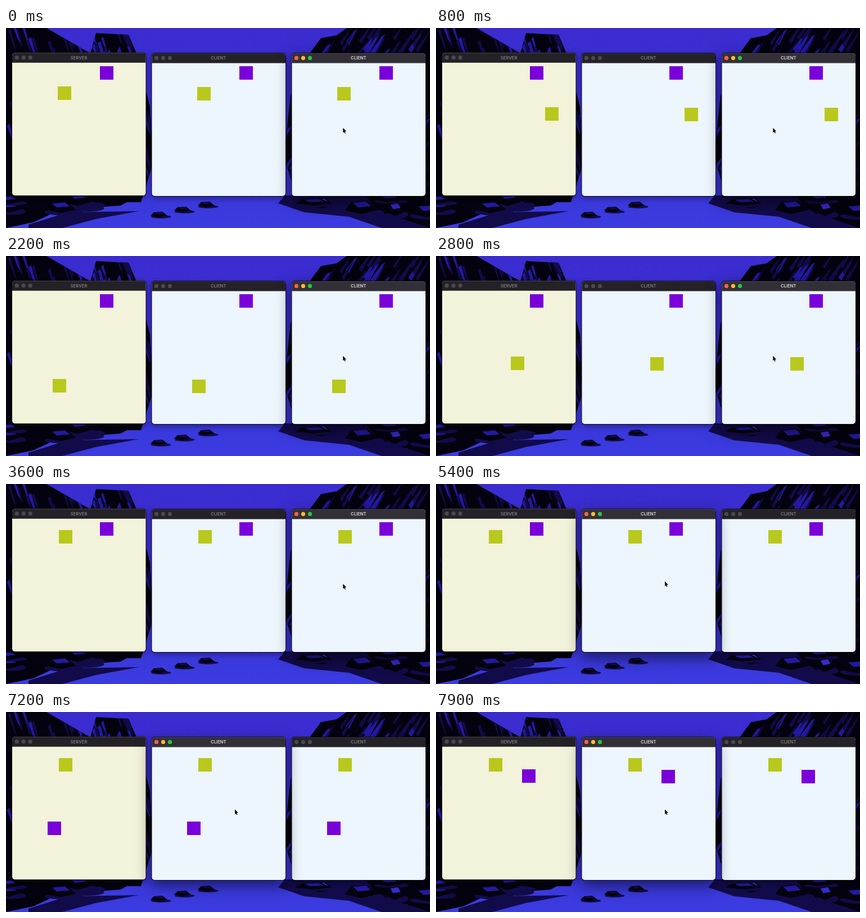
An HTML page with a canvas for the animation above (8 s loop, 754 by 356 pixels).

```html
<!DOCTYPE html>
<html lang="en">
<head>
<meta charset="utf-8">
<title>Server and clients</title>
<style>
html, body { margin: 0; width: 100%; height: 100%; overflow: hidden; background: #3b2fd4; }
canvas { display: block; width: 754px; height: 356px; }
</style>
</head>
<body>
<canvas id="stage" width="754" height="356"></canvas>
<script>
const W = 754, H = 356, LOOP = 8000, STEP = 100;
const canvas = document.getElementById('stage');
const ctx = canvas.getContext('2d');

const windows = [
  { title: 'SERVER', x: 11, y: 44.3, fill: '#f3f2da' },
  { title: 'CLIENT', x: 259.3, y: 45, fill: '#edf5fd' },
  { title: 'CLIENT', x: 508.3, y: 45, fill: '#edf5fd' }
];
const WIN_W = 237.7, WIN_H = 254, BAR = 17.5, BOX = 24;
const ROCK = { black: '#04020e', navy: '#120b4a', mid: '#2419a0', blue: '#352bcb' };

// Evenly timed waypoints, placed in the first window
const walkers = [
  {
    color: '#b9c81c', start: 0, every: 400,
    points: [[91.5, 104], [125, 158], [194, 141], [112, 102], [62.3, 139.3],
      [65, 203], [104, 222], [132.7, 179], [127, 106], [94, 81.5]]
  },
  {
    color: '#7a00da', start: 5800, every: 350,
    points: [[167, 67.7], [170, 128], [160, 206], [110, 234],
      [73.8, 194.7], [130, 99], [152.8, 102]]
  }
];

const clamp = (v, lo, hi) => Math.min(hi, Math.max(lo, v));

// Smooth curve through the waypoints, at rest at both ends
function place({ points, start, every }, t) {
  const last = points.length - 1;
  const s = clamp((t - start) / every, 0, last);
  const i = Math.min(Math.floor(s), last - 1), u = s - i;
  const slope = (k, axis) =>
    k === 0 || k === last ? 0 : (points[k + 1][axis] - points[k - 1][axis]) / 2;
  return [0, 1].map(axis => {
    const a = points[i][axis], d = points[i + 1][axis] - a;
    const m = slope(i, axis), n = slope(i + 1, axis);
    return a + u * m + u * u * (3 * d - 2 * m - n) + u * u * u * (m + n - 2 * d);
  });
}

function randomizer(seed) {
  return (lo, hi) => {
    seed = (seed * 16807) % 2147483647;
    return lo + (hi - lo) * seed / 2147483647;
  };
}

function poly(g, color, points) {
  g.fillStyle = color;
  g.beginPath();
  points.forEach(p => g.lineTo(...p));
  g.fill();
}

function oval(g, color, x, y, rx, ry) {
  g.fillStyle = color;
  g.beginPath();
  g.ellipse(x, y, rx, ry, 0, 0, Math.PI * 2);
  g.fill();
}

// A cliff face with slanted streaks of light
function cliff(g, rnd, outline, lean, streaks) {
  const xs = outline.map(p => p[0]);
  const left = Math.min(...xs), right = Math.max(...xs);
  g.save();
  poly(g, ROCK.black, outline);
  g.clip();
  for (let i = 0; i < streaks; i++) {
    const x = rnd(left, right), y = rnd(-10, 280);
    const w = rnd(2, 7), h = rnd(18, 48);
    const color = [ROCK.navy, ROCK.mid, ROCK.navy][i % 3];
    poly(g, color, [[x, y], [x + w, y - 4], [x + w + lean * h, y + h], [x + lean * h, y + h * 0.8]]);
  }
  g.restore();
}

// A flat-topped stone with its shadow on the water
function boulder(g, x, y, w, h, lit) {
  oval(g, ROCK.navy, x + w * 0.12, y + h * 0.4, w * 0.6, h * 0.3);
  poly(g, ROCK.black, [[x - w / 2, y + h * 0.2], [x - w * 0.3, y - h * 0.4],
    [x + w * 0.2, y - h * 0.5], [x + w / 2, y + h * 0.2], [x, y + h / 2]]);
  poly(g, lit, [[x - w * 0.25, y - h * 0.35], [x + w * 0.15, y - h * 0.45],
    [x + w * 0.3, y - h * 0.1], [x - w * 0.1, y]]);
}

function paintScene() {
  const scene = document.createElement('canvas');
  scene.width = W;
  scene.height = H;
  const g = scene.getContext('2d');
  const rnd = randomizer(29);

  const sky = g.createLinearGradient(0, 0, 0, H);
  sky.addColorStop(0, '#3b2cd0');
  sky.addColorStop(0.6, '#3730d2');
  sky.addColorStop(1, '#3b3ce0');
  g.fillStyle = sky;
  g.fillRect(0, 0, W, H);

  for (let i = 0; i < 20; i++) {
    g.fillStyle = 'rgba(110,120,240,.3)';
    g.fillRect(rnd(240, 500), rnd(30, 36), 1, 1);
  }

  cliff(g, rnd, [[0, 0], [72, 0], [150, 45], [160, 9], [218, 12], [232, 45],
    [256, 140], [262, 240], [240, 310], [0, 310]], 0.3, 150);
  cliff(g, rnd, [[W, 0], [606, 0], [588, 13], [560, 18], [540, 45],
    [506, 120], [494, 230], [520, 310], [W, 310]], -0.6, 150);

  // Banks on both sides of the water
  poly(g, ROCK.black, [[0, 298], [236, 298], [204, 316], [96, 324], [48, 346], [0, H]]);
  poly(g, ROCK.navy, [[496, 298], [W, 298], [W, H], [668, H], [610, 336], [530, 328], [484, 312]]);
  poly(g, ROCK.black, [[640, 298], [W, 298], [W, H], [712, 342], [660, 326]]);
  poly(g, ROCK.navy, [[40, 350], [110, 328], [236, 326], [160, 340], [100, H], [40, H]]);
  for (let i = 0; i < 12; i++) {
    const side = i % 2, far = rnd(0, 210);
    const x = side ? W - far : far;
    boulder(g, x, rnd(303, 326 - far / 20), rnd(30, 64), rnd(12, 26), i % 3 ? ROCK.mid : ROCK.blue);
  }
  for (let i = 0; i < 3; i++) boulder(g, 272 + 42 * i, 332 - 9 * i, 30, 10, ROCK.navy);
  return scene;
}
const scene = paintScene();

function frame(x, y, grow) {
  ctx.beginPath();
  ctx.roundRect(x - grow, y - grow, WIN_W + 2 * grow, WIN_H + 2 * grow, 5);
}

function drawWindow({ x, y, title, fill }, active) {
  ctx.save();
  ctx.shadowColor = active ? 'rgba(0,0,0,.55)' : 'rgba(0,0,0,.35)';
  ctx.shadowBlur = active ? 27 : 10;
  ctx.shadowOffsetY = active ? 9 : 4;
  ctx.fillStyle = '#08060c';
  frame(x, y, 0.7);
  ctx.fill();
  ctx.restore();

  ctx.save();
  frame(x, y, 0);
  ctx.clip();
  ctx.fillStyle = fill;
  ctx.fillRect(x, y, WIN_W, WIN_H);
  ctx.fillStyle = active ? '#323036' : '#242226';
  ctx.fillRect(x, y, WIN_W, BAR);
  ctx.fillStyle = active ? '#59565e' : '#3c393f';
  ctx.fillRect(x, y, WIN_W, 0.7);
  ctx.restore();

  ['#fe5f57', '#febc2e', '#28c840'].forEach((color, i) =>
    oval(ctx, active ? color : '#4b494d', x + 8.2 + 12 * i, y + 8.4, 3.6, 3.6));
  ctx.fillStyle = active ? '#cccacd' : '#757278';
  ctx.font = '700 7.6px Inter, Roboto, sans-serif';
  ctx.textAlign = 'center';
  ctx.fillText(title, x + WIN_W / 2 - 0.3, y + 11.2);
}

function drawBoxes(win, t) {
  const server = windows[0];
  // Clients fall behind for a moment now and then
  const lag = win !== server && t % 1600 === 0 ? 20 : 0;
  for (const walker of walkers) {
    const [x, y] = place(walker, t - lag);
    ctx.fillStyle = walker.color;
    ctx.fillRect(Math.round(x + win.x - server.x), Math.round(y + win.y - server.y), BOX, BOX);
  }
}

function drawCursor(t) {
  const u = clamp((t - 4000) / 800, 0, 1);
  const ease = u * u * (3 - 2 * u);
  ctx.save();
  ctx.translate(599.3 - 192.3 * ease, 177.8 - 4.5 * ease);
  ctx.beginPath();
  [[0, 0], [0, 8.6], [1.9, 6.9], [3.2, 9.9], [4.6, 9.3], [3.3, 6.4], [5.8, 6.2]]
    .forEach(p => ctx.lineTo(...p));
  ctx.closePath();
  ctx.strokeStyle = '#fff';
  ctx.stroke();
  ctx.fillStyle = '#000';
  ctx.fill();
  ctx.restore();
}

function draw(now) {
  const t = Math.floor((now % LOOP) / STEP) * STEP;
  const front = windows[t < 4800 ? 2 : 1];
  ctx.drawImage(scene, 0, 0);
  for (const win of [...windows.filter(w => w !== front), front]) {
    drawWindow(win, win === front);
    drawBoxes(win, t);
  }
  drawCursor(t);
  requestAnimationFrame(draw);
}
requestAnimationFrame(draw);
</script>
</body>
</html>
```
